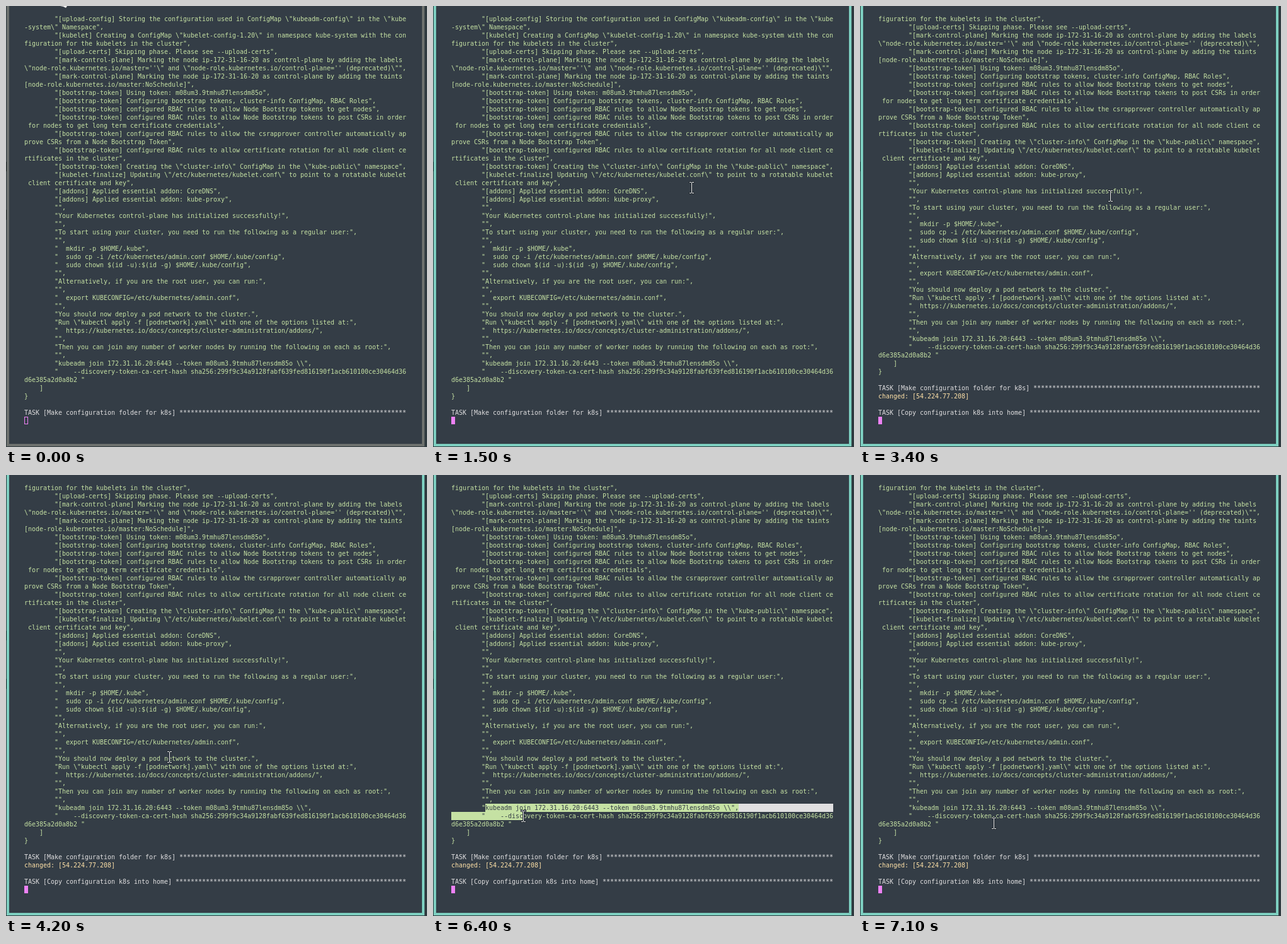
Animation of 668x699 px, one loop 8000 ms. Source, as an HTML page with a canvas:

```html
<!DOCTYPE html>
<html lang="en">
<head>
<meta charset="utf-8">
<title>Terminal</title>
<style>
  html, body { margin: 0; height: 100%; overflow: hidden; background: #343d46; }
  canvas { display: block; }
</style>
</head>
<body>
<canvas id="stage" width="668" height="699"></canvas>
<script>
const LOOP = 8000, STEP = 100;
const COLS = 101, CELL_W = 6, CELL_H = 13, LEFT = 29, TOP = 14;
const BG = '#343d46', GREEN = '#c5e1a3', WHITE = '#e0dfe0', YELLOW = '#ffe2a8',
      MAGENTA = '#ee82f5', TEAL = '#7dcfc0', GREY = '#6d716e';

const messages = String.raw`[upload-config] Storing the configuration used in ConfigMap \"kubeadm-config\" in the \"kube-system\" Namespace
[kubelet] Creating a ConfigMap \"kubelet-config-1.20\" in namespace kube-system with the configuration for the kubelets in the cluster
[upload-certs] Skipping phase. Please see --upload-certs
[mark-control-plane] Marking the node ip-172-31-16-20 as control-plane by adding the labels \"node-role.kubernetes.io/master=''\" and \"node-role.kubernetes.io/control-plane='' (deprecated)\"
[mark-control-plane] Marking the node ip-172-31-16-20 as control-plane by adding the taints [node-role.kubernetes.io/master:NoSchedule]
[bootstrap-token] Using token: m08um3.9tmhu87lensdm85o
[bootstrap-token] Configuring bootstrap tokens, cluster-info ConfigMap, RBAC Roles
[bootstrap-token] configured RBAC rules to allow Node Bootstrap tokens to get nodes
[bootstrap-token] configured RBAC rules to allow Node Bootstrap tokens to post CSRs in order for nodes to get long term certificate credentials
[bootstrap-token] configured RBAC rules to allow the csrapprover controller automatically approve CSRs from a Node Bootstrap Token
[bootstrap-token] configured RBAC rules to allow certificate rotation for all node client certificates in the cluster
[bootstrap-token] Creating the \"cluster-info\" ConfigMap in the \"kube-public\" namespace
[kubelet-finalize] Updating \"/etc/kubernetes/kubelet.conf\" to point to a rotatable kubelet client certificate and key
[addons] Applied essential addon: CoreDNS
[addons] Applied essential addon: kube-proxy

Your Kubernetes control-plane has initialized successfully!

To start using your cluster, you need to run the following as a regular user:

  mkdir -p $HOME/.kube
  sudo cp -i /etc/kubernetes/admin.conf $HOME/.kube/config
  sudo chown $(id -u):$(id -g) $HOME/.kube/config

Alternatively, if you are the root user, you can run:

  export KUBECONFIG=/etc/kubernetes/admin.conf

You should now deploy a pod network to the cluster.
Run \"kubectl apply -f [podnetwork].yaml\" with one of the options listed at:
  https://kubernetes.io/docs/concepts/cluster-administration/addons/

Then you can join any number of worker nodes by running the following on each as root:

kubeadm join 172.31.16.20:6443 --token m08um3.9tmhu87lensdm85o \\
    --discovery-token-ca-cert-hash sha256:299f9c34a9128fabf639fed816190f1acb610100ce30464d36d6e385a2d0a8b2 `.split('\n');

const rows = [];
function print(text, color) {
  for (const part of text.match(new RegExp(`.{1,${COLS}}`, 'g')) || ['']) rows.push({ text: part, color });
}
const printTask = name => print(`TASK [${name}] `.padEnd(COLS, '*'), WHITE);

messages.forEach((m, i) => print(`        "${m}"${i < messages.length - 1 ? ',' : ''}`, GREEN));
print('    ]', GREEN);
print('}', GREEN);
print('', GREEN);
printTask('Make configuration folder for k8s');
print('changed: [54.224.77.208]', YELLOW);
print('', GREEN);
printTask('Copy configuration k8s into home');

// Pointer path: time, x, y
const path = [
  [100, 92, 0], [200, 104, 10], [400, 168, 48], [700, 268, 100], [900, 292, 127], [1000, 266, 249],
  [1100, 305, 296], [1200, 365, 330], [1300, 427, 316], [1400, 418, 297], [1500, 410, 288],
  [2300, 410, 288], [2400, 410, 287], [3300, 410, 287], [3600, 372, 330], [3900, 290, 415], [4200, 259, 447],
  [5200, 259, 447], [5500, 180, 488], [5700, 105, 522], [5900, 82, 531],
  [6000, 82, 531], [6100, 87, 531], [6200, 103, 534], [6400, 143, 541], [6600, 212, 552]
];
function pointerAt(t) {
  const i = path.findIndex(p => p[0] >= t);
  if (i < 0) return path[path.length - 1].slice(1);
  if (i === 0) return path[0].slice(1);
  const [t0, x0, y0] = path[i - 1], [t1, x1, y1] = path[i];
  const k = (t - t0) / (t1 - t0);
  return [Math.round(x0 + (x1 - x0) * k), Math.round(y0 + (y1 - y0) * k)];
}

const ctx = document.getElementById('stage').getContext('2d');
const colX = c => LEFT + c * CELL_W;
const rowY = r => TOP + r * CELL_H;
function rect(color, x, y, w, h) {
  ctx.fillStyle = color;
  ctx.fillRect(x, y, w, h);
}

function drawFrame(color) {
  rect('#303b40', 0, 0, 668, 699);
  rect('#10181b', 0, 247, 1, 15);
  rect('#10181b', 0, 323, 1, 16);
  rect(color, 1, 0, 663, 698);
  rect(BG, 5, 0, 655, 694);
}

function drawText(first, selected) {
  ctx.font = '10px "DejaVu Sans Mono", monospace';
  ctx.textBaseline = 'alphabetic';
  for (let r = 0; r < 49; r++) {
    const { text, color } = rows[first + r];
    for (let c = 0; c < COLS; c++) {
      const on = selected(r, c);
      if (on) rect(c < text.length ? color : WHITE, colX(c), rowY(r), CELL_W, CELL_H);
      if (!text[c] || text[c] === ' ') continue;
      ctx.fillStyle = on ? BG : color;
      ctx.fillText(text[c], colX(c), rowY(r) + 10);
    }
  }
}

function drawCaret(focused) {
  rect(MAGENTA, LEFT, rowY(49), CELL_W, CELL_H - 1);
  if (!focused) rect(BG, LEFT + 1, rowY(49) + 1, CELL_W - 2, CELL_H - 3);
}

function drawArrowTip() {
  ctx.fillStyle = '#f4f4f4';
  ctx.beginPath();
  ctx.moveTo(86, 0);
  ctx.lineTo(97, 0);
  ctx.lineTo(95, 3);
  ctx.lineTo(91, 1);
  ctx.fill();
}

function drawBeam(x, y) {
  const bars = [[-3, -9, 3, 1], [1, -9, 3, 1], [0, -8, 1, 16], [-3, 8, 3, 1], [1, 8, 3, 1]];
  for (const [dx, dy, w, h] of bars) rect('#252c33', x + dx - 1, y + dy - 1, w + 2, h + 2);
  for (const [dx, dy, w, h] of bars) rect('#f0f0f0', x + dx, y + dy, w, h);
}

function draw(t) {
  const focused = t >= 200;
  const [x, y] = pointerAt(t);
  const cell = (r, c) => r * COLS + c;
  const start = cell(39, 9);
  const end = t >= 6100 && t < 6900
    ? cell(Math.floor((y - TOP) / CELL_H), Math.round((x - LEFT) / CELL_W)) : start;

  drawFrame(focused ? TEAL : GREY);
  drawText(t < 1700 ? 0 : 3, (r, c) => cell(r, c) >= start && cell(r, c) < end);
  drawCaret(focused);
  if (focused) drawBeam(x, y);
  else drawArrowTip();
}

let shown = -1;
function tick() {
  const t = Math.floor(performance.now() % LOOP / STEP) * STEP;
  if (t !== shown) draw(shown = t);
  requestAnimationFrame(tick);
}
tick();
</script>
</body>
</html>
```
